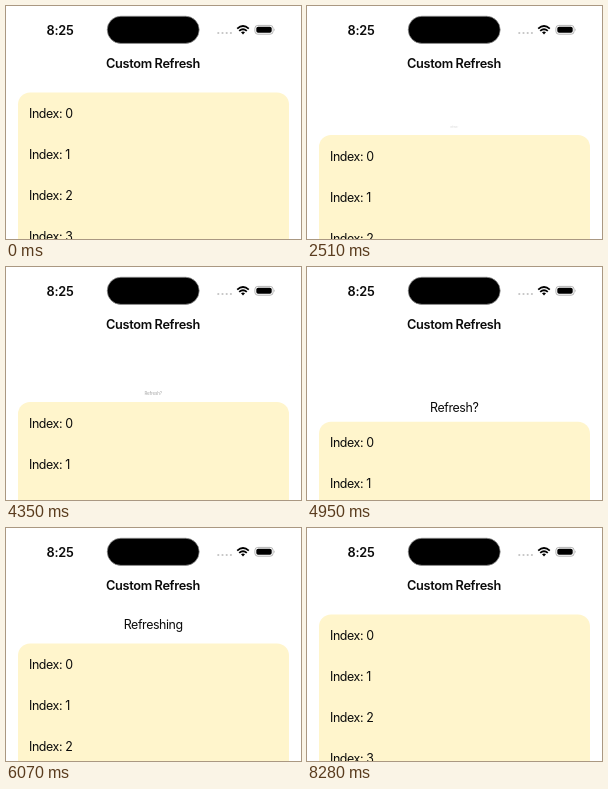
Write an HTML page that moves like this. It is 295 by 233 pixels and loops after 8690 ms.

```html
<!DOCTYPE html>
<html lang="en">
<head>
<meta charset="utf-8">
<title>Custom Refresh</title>
<style>
  html, body { margin: 0; width: 100%; height: 100%; overflow: hidden; background: #fff; }
  svg { display: block; width: 100vw; height: 100vh; }
  text { font: 400 12.4px Inter, "Open Sans", sans-serif; letter-spacing: -.4px; fill: #0b0b0b; }
  .bold { font-weight: 600; font-size: 12.76px; letter-spacing: -.35px; }
  .clock { letter-spacing: -.25px; }
  .mid { text-anchor: middle; }
</style>
</head>
<body>
<svg viewBox="0 0 295 233">
  <text class="mid" id="ask">Refresh?</text>
  <text class="mid" id="busy">Refreshing</text>

  <g id="panel">
    <rect x="12" width="271" height="300" rx="12" fill="#fff5cc"/>
  </g>

  <text class="bold clock" x="40.5" y="28.5">8:25</text>
  <rect x="101.2" y="10.2" width="92" height="27.2" rx="13.6" stroke="#999" stroke-width=".7"/>
  <g fill="#c4c4c4">
    <circle cx="212.3" cy="27" r="1.1"/><circle cx="216.5" cy="27" r="1.1"/>
    <circle cx="220.7" cy="27" r="1.1"/><circle cx="224.9" cy="27" r="1.1"/>
  </g>
  <g fill="none" stroke="#000" stroke-width="1.8">
    <path d="M231.2 22.6Q237 17.4 242.8 22.6"/>
    <path d="M233.2 24.9Q237 21.5 240.8 24.9"/>
    <path d="M235 26.2Q237 24.7 239 26.2L237 28.4Z" fill="#000" stroke="none"/>
  </g>
  <rect x="248.9" y="19.4" width="18.2" height="8.8" rx="2.9" fill="none" stroke="#b4b4b4"/>
  <rect x="250.3" y="20.8" width="15.4" height="6" rx="1.8"/>
  <path d="M268.1 22.3q1.5 1.5 0 3z" fill="#b4b4b4"/>
  <text class="bold mid" x="147" y="62.1">Custom Refresh</text>
</svg>
<script>
const LOOP = 8690, STEP = 115, LEAD = 22;
const REST = 86.5, ROW = 41.1, CENTER = 147.2;
const TRIGGER = 5510, DONE = 7460;
const $ = id => document.getElementById(id);
const panel = $('panel'), ask = $('ask'), busy = $('busy');

for (let i = 0; i < 4; i++) {
  const row = document.createElementNS('http://www.w3.org/2000/svg', 'text');
  row.setAttribute('x', 23);
  row.setAttribute('y', 25.6 + i * ROW);
  row.textContent = 'Index: ' + i;
  panel.append(row);
}

const smooth = u => u * u * (3 - 2 * u);
const pullIn = u => u ** 1.85;
const springOut = u => 1 - (1 - u) ** 4;
const clamp = x => Math.min(1, Math.max(0, x));

// Finger drags, the release, and the return to rest.
const moves = [
  { from: 1060, until: 2760, to: 142, ease: pullIn },
  { from: 2830, until: 3210, to: 156.5, ease: smooth },
  { from: 3440, until: 4140, to: 129, ease: smooth },
  { from: 4160, until: 4820, to: 154, ease: smooth },
  { from: 4850, until: 5510, to: 168, ease: smooth },
  { from: 5520, until: 6070, to: 115.4, ease: springOut },
  { from: DONE, until: 8280, to: REST, ease: smooth }
];

const progress = (move, t) =>
  move.ease(clamp((t - move.from) / (move.until - move.from)));

const panelTop = t =>
  moves.reduce((top, move) => top + (move.to - top) * progress(move, t), REST);

function place(label, middle, scale, opacity) {
  label.setAttribute('transform', `translate(${CENTER} ${middle + 4.5 * scale}) scale(${scale})`);
  label.setAttribute('opacity', opacity);
}

function draw(elapsed) {
  // The screen refreshes in coarse, even steps.
  const t = Math.floor((elapsed % LOOP + LEAD) / STEP) * STEP;
  const top = panelTop(t);
  const swap = clamp((t - TRIGGER) / 200);
  const askScale = swap ? 1 : clamp((top - 124) / 30);
  const busyScale = 1 - progress(moves[moves.length - 1], t);

  panel.setAttribute('transform', `translate(0 ${top})`);
  place(ask, top - 6 - 8.5 * askScale, askScale, askScale * (1 - swap));
  place(busy, Math.max(95.5, top - 19), busyScale, swap * busyScale);
}

const start = performance.now();
function tick() {
  draw(performance.now() - start);
  requestAnimationFrame(tick);
}
tick();
</script>
</body>
</html>
```
